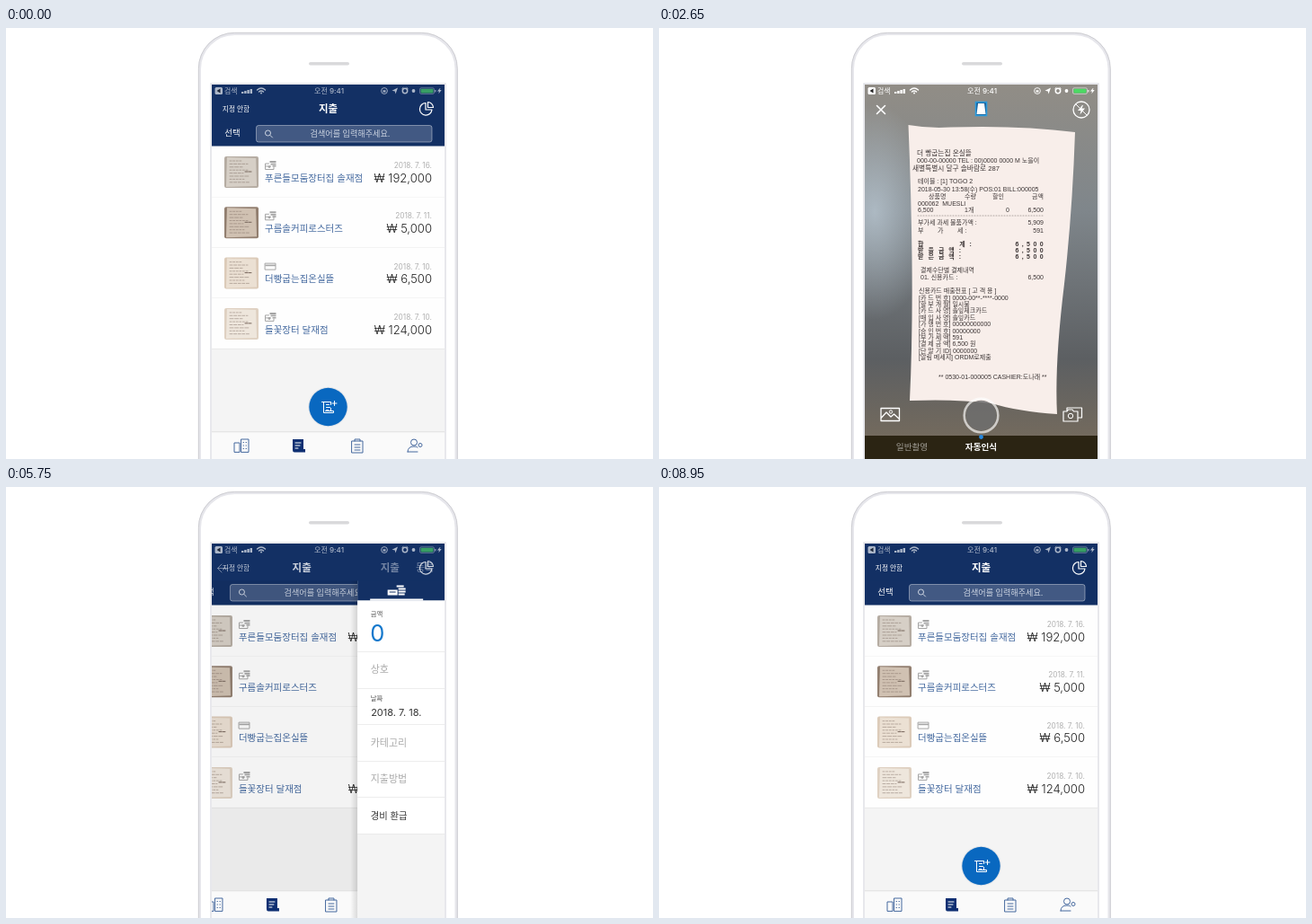
An HTML page that plays this animation: 720 px wide and 480 px high, repeating every 9000 ms.

```html
<!DOCTYPE html>
<html lang="ko">
<head>
<meta charset="utf-8">
<style>
  html, body { margin: 0; width: 100%; height: 100%; overflow: hidden; background: #fff; }
  svg { display: block; }
  text { font-family: Inter, "Noto Sans CJK KR", "Noto Sans CJK JP", sans-serif; white-space: pre; }
  .receipt text { font-family: "Liberation Sans", "Noto Sans CJK KR", "Noto Sans CJK JP", sans-serif; }
  .line { fill: none; stroke-width: 1; stroke-linecap: round; stroke-linejoin: round; }
</style>
</head>
<body>
<script>
const NAVY = '#133064';

// Markup helpers; text is placed by its vertical centre.
const text = (x, y, size, str, fill = '#fff', anchor = 'start', extra = '') =>
  `<text x="${x}" y="${y + size * 0.36}" font-size="${size}" fill="${fill}" text-anchor="${anchor}" ${extra}>${str}</text>`;
const rect = (x, y, w, h, fill, extra = '') =>
  `<rect x="${x}" y="${y}" width="${w}" height="${h}" fill="${fill}" ${extra}/>`;
const line = (d, stroke = '#fff', extra = '') => `<path class="line" d="${d}" stroke="${stroke}" ${extra}/>`;
const fill = (d, color = '#fff') => `<path d="${d}" fill="${color}"/>`;
const circle = (x, y, r, color, extra = '') => `<circle cx="${x}" cy="${y}" r="${r}" fill="${color}" ${extra}/>`;
const group = (id, content, extra = '') => `<g id="${id}" ${extra}>${content}</g>`;
const at = (x, y, content, scale = 1) => `<g transform="translate(${x} ${y}) scale(${scale})">${content}</g>`;
const BOLD = 'font-weight="700"', MEDIUM = 'font-weight="500"', LIGHT = 'font-weight="300"';

const cashIcon = color =>
  fill('M-1-5H6V-3H-1ZM0-2.3H6V-.6H0ZM2 0H6V1.6H2Z', color) +
  line('M-2-2H-6V4.5H3.5V2M-6 1H0', color) + circle(-1.5, 1.6, 1.4, color);
const cardIcon = color => line('M-6-3.5H5.5V3.5H-6Z', color) + rect(-6, -2, 11.5, 1.6, color);

// Expense list
function thumbnail(y, paper, edge) {
  let marks = '';
  for (let i = 0; i < 8; i++) {
    marks += line(`M249 ${y + 5 + i * 3.4}H${262 + (i * 7) % 13}`, '#75645a',
      `stroke-dasharray="${2 + i % 3} 1.6" opacity=".55" style="stroke-width:.8"`);
  }
  return rect(243, y, 38, 35, edge, 'rx="2"') +
    fill(`M246 ${y + 1}L278 ${y + 2}L279 ${y + 33}L245 ${y + 34}Z`, paper) + marks +
    line(`M266 ${y + 17}h8`, '#75645a', 'stroke-dasharray="3 1"');
}
const expenses = [
  ['푸른들모둠장터집 솔재점', '2018. 7. 16.', '192,000', cashIcon, '#d6cfc6', '#b5aca2'],
  ['구름솔커피로스터즈', '2018. 7. 11.', '5,000', cashIcon, '#d0c1b2', '#927f70'],
  ['더빵굽는집온실뜰', '2018. 7. 10.', '6,500', cardIcon, '#ebe0d3', '#dccbb9'],
  ['들꽃장터 달재점', '2018. 7. 10.', '124,000', cashIcon, '#eee6dc', '#dfd1c2'],
];
const rows = expenses.map(([name, date, amount, icon, paper, edge], i) => {
  const y = 132 + i * 56.3;
  return rect(229, y, 259, 56.3, '#fefefe') + rect(229, y + 56, 259, 0.8, '#e6e6e6') +
    thumbnail(y + 11, paper, edge) + at(294.5, y + 21, icon('#a5a5a5')) +
    text(288, y + 35, 10.5, name, '#44699f') +
    text(474, y + 21, 8.3, date, '#b0b0b0', 'end') +
    text(474, y + 35, 13.1, '₩ ' + amount, '#222', 'end', LIGHT);
}).join('');

const receiptPlus = line('M-6-6H4M-4-6V6H7V4H-2M4-6V-3M4 1V4M-1-3H2M-1 0H3M-1 3H1M8-7V-2M5.5-4.5H10.5');
const list = rect(229, 63, 259, 470, '#f4f4f4') + rect(229, 63, 259, 68.5, NAVY) +
  text(252, 117, 9.4, '선택', '#fff', 'middle', MEDIUM) +
  rect(278.5, 108.5, 195.5, 18.5, '#ffffff33', 'rx="2.5" stroke="#ffffff80" stroke-width=".8"') +
  circle(291.5, 117, 3, 'none', 'stroke="#cdd5e2"') + line('M294 119.5L296.5 122', '#cdd5e2') +
  text(383, 117.5, 9.1, '검색어를 입력해주세요.', '#cdd5e2', 'middle') + rows;

const tabs = rect(229, 449.5, 345, 80, '#fafafa') + rect(229, 449.5, 345, 0.7, '#d5d5d5') +
  line('M254 472V462H260V472ZM261.5 472V458H270V472ZM264 461.5h.5M267 461.5h.5M264 465h.5M267 465h.5M264 468.5h.5M267 468.5h.5', '#45689e') +
  fill('M319 458H331V469H333V472.5H321Q319 472.5 319 470Z', '#0e2f72') +
  line('M322 462H328M322 465H327M322 468H325') +
  line('M385 460H397V473H385ZM388 460V458H394V460M388 464H394M388 467H394M388 470H394', '#45689e') +
  line('M447 472Q447 466 454 466Q457 466 458 467M447 472H458', '#45689e') +
  circle(454, 461.5, 3.5, 'none', 'stroke="#45689e"') + circle(461, 464.5, 2, 'none', 'stroke="#45689e"');

const fab = circle(358.5, 422, 22.2, '#dfe3e8') + circle(358.5, 422, 21.2, '#0968c0') + at(357.5, 422.5, receiptPlus);

// Expense form
const letters = ['', 'ABC', 'DEF', 'GHI', 'JKL', 'MNO', 'PQRS', 'TUV', 'WXYZ'];
function key(col, row, digit, sub = '') {
  const x = 233 + col * 85, y = 349 + row * 33.7;
  return rect(x, y + 1, 81, 29.3, '#8f9299', 'rx="3"') + rect(x, y, 81, 29.3, '#fff', 'rx="3"') +
    text(x + 40.5, y + (digit ? 10.5 : 14.5), 16, digit || 0, '#111', 'middle') +
    text(x + 41, y + 22.5, 6, sub, '#111', 'middle', 'font-weight="600" letter-spacing="1"');
}
const keypad = rect(229, 318, 259, 28, '#f5f5f7') + text(240, 331, 10.6, '기호변환', '#2b93d8') +
  rect(229, 345.5, 259, 190, '#d1d3da') +
  letters.map((sub, i) => key(i % 3, Math.floor(i / 3), i + 1, sub)).join('') + key(1, 3, 0);

const car = line('M-10 2Q-10-1-6-1.5L-3-4.5H3L6-1.5Q10-1 10 2.5H8M-10 2.5H-8M-4 2.5H4M-6-1.5H6M0-4.5V-1.5') +
  circle(-6, 3, 1.9, 'none', 'stroke="#fff"') + circle(6, 3, 1.9, 'none', 'stroke="#fff"');
const stack = fill('M0-6H8V-4H0ZM2-3H10V-1H2ZM2 0H10V2H2ZM2 3H9V5H2Z') + rect(-10, -1, 11, 6, '#fff') + rect(-8, 1, 7, 1, NAVY);
const form = rect(221, 104, 8, 430, 'url(#shadow)') + rect(229, 104, 259, 430, '#f4f4f4') +
  rect(229, 104, 259, 22.5, NAVY) + at(272.5, 115.5, stack) + at(358, 115, car) +
  rect(243, 124.5, 59, 2, '#fff') + rect(229, 126.5, 259, 259.5, '#fff') +
  [183, 224, 264, 305, 345, 386].map(y => rect(229, y, 259, 0.8, '#e9e9e9')).join('') +
  text(243.5, 141.5, 7.4, '금액', '#555') + text(243, 163, 25.5, '0', '#1478cc') +
  rect(377, 155.5, 60, 14, '#fff', 'rx="2.5" stroke="#b9b9b9" stroke-width=".8"') + text(385, 162.5, 7.6, 'KRW', '#555') +
  text(243.5, 203.5, 11, '상호', '#aaa') + text(243.5, 235.5, 7.4, '날짜', '#555') +
  text(244, 251, 11, '2018. 7. 18.', '#333') + text(243.5, 285, 11, '카테고리', '#aaa') +
  text(243.5, 325.5, 11, '지출방법', '#aaa') + text(243.5, 366, 10.3, '경비 환급', '#333') + group('keypad', keypad);

// Camera
const ink = '#3d3636';
const print = (x, y, str, anchor = 'start', extra = '') => text(x, y, 7, str, ink, anchor, extra);
const details = ['[카 드 번 호] 0000-00**-****-0000', '[할 부 개 월] 일시불', '[카 드 사 명] 솔잎체크카드',
  '[매 입 사 명] 솔잎카드', '[가 맹 번 호] 00000000000', '[승 인 번 호] 00000000',
  '[부 가 세 액] 591', '[결 제 금 액] 6,500 원', '[단 말 기 ID] 0000000', '[알림 메세지] ORDM로제출'];
const receipt = fill('M277.5 108Q300 112 325 110.5Q400 108 463 116Q460 205 451 285Q440 375 443 430Q400 427 370 418Q330 413 279 415Q285 290 277.5 108Z', '#f8eeea') +
  text(287, 139, 7.7, '더 빵굽는집 온실뜰', ink) +
  print(287, 147.5, '000-00-00000 TEL : 00)0000 0000 M 노을이') +
  text(282, 156, 7.7, '새별특별시 달구 솔바람로 287', ink) +
  print(288, 170.5, '테이블 : [1] TOGO 2') +
  print(288, 179.5, '2018-05-30 13:58(수) POS:01 BILL:000005') +
  print(300, 187, '상품명') + print(340, 187, '수량') + print(371, 187, '할인') + print(428, 187, '금액', 'end') +
  print(288, 195, '000062  MUESLI') +
  print(288, 202.5, '6,500') + print(340, 202.5, '1개') + print(386, 202.5, '0') + print(428, 202.5, '6,500', 'end') +
  line('M288 209H428', ink, 'stroke-dasharray="1 2" opacity=".4"') +
  print(288, 216.5, '부가세 과세 물품가액 :') + print(428, 216.5, '5,909', 'end') +
  print(288, 225, '부        가        세 :') + print(428, 225, '591', 'end') +
  ['합     계:', '받을금액:', '받은금액:'].map((s, i) =>
    print(288, 240 + i * 7.3, s, 'start', BOLD + ' letter-spacing="5"') +
    print(431, 240 + i * 7.3, '6,500', 'end', BOLD + ' letter-spacing="3.4"')).join('') +
  print(291, 269, '결제수단별 결제내역') + print(291, 277, '01. 신용카드 :') + print(428, 277, '6,500', 'end') +
  print(289, 292, '신용카드 매출전표 [ 고 객 용 ]') +
  details.map((s, i) => print(289, 300 + i * 7.4, s)).join('') +
  print(311, 388, '** 0530-01-000005 CASHIER:도나래 **');

const bolt = fill('M1-5L-4 1H-.5L-1.5 5.5L4-1.5H.5L2-5Z');
const camera = rect(229, 63, 259, 470, '#000') +
  group('feed', rect(229, 63, 259, 470, 'url(#desk)') + rect(229, 63, 259, 470, 'url(#glow)') +
    group('paper', receipt, 'class="receipt"') +
    group('detected', fill('M269.5 110L470 114Q460 270 449 432L275 421Z', '#3292e6'))) +
  line('M242.5 86.5L251.5 95.5M251.5 86.5L242.5 95.5', '#fff', 'style="stroke-width:1.6"') +
  rect(352.5, 82.5, 12, 15, '#17588f', 'stroke="#2a9bdd" stroke-width="1.6"') + fill('M355 84H362L363.5 96H353.5Z') +
  circle(470, 91, 9, 'none', 'stroke="#fff" stroke-width="1.3"') + at(470, 91, bolt) + line('M464 85L476 97') +
  line('M247 423.5H267.5V437.5H247ZM247.5 434L253 428L258 433L261.5 430L267 435', '#fff', 'style="stroke-width:1.3"') +
  circle(258, 427.5, 1.7, 'none', 'stroke="#fff"') +
  circle(358.5, 431.5, 16.8, '#6f6f6f', 'opacity=".8"') + circle(358.5, 431.5, 18.8, 'none', 'stroke="#ffffffa8" stroke-width="2.6"') +
  group('burst', line('M450 427H454L455.5 425H460L461.5 427H466V438H450ZM454 426V423H470.5V434H467', '#fff', 'style="stroke-width:1.2"') +
    circle(458, 432, 2.7, 'none', 'stroke="#fff"')) +
  rect(229, 454, 259, 80, '#1a1300', 'opacity=".8"') + circle(358.5, 455.5, 2.4, '#2587df') +
  text(0, 467, 9.6, '일반촬영', '#fff', 'middle', 'id="manual"') +
  text(0, 467, 9.6, '자동인식', '#fff', 'middle', 'id="auto"');

// Navigation and status bars
const nav = rect(229, 63, 259, 41.5, NAVY) +
  group('oldNav', text(256, 90.5, 7.7, '지정 안함', '#fff', 'middle', MEDIUM) +
    line('M467 83.5A6.8 6.8 0 1 0 474 91H467ZM469.5 82.5V88.5H475.5A6.3 6.3 0 0 0 469.5 82.5', '#fff', 'style="stroke-width:1.2"')) +
  text(358.5, 89.5, 11.5, '지출', '#fff', 'middle', BOLD + ' id="oldTitle"') +
  group('newNav', line('M247 90.5H236M240 86L235.5 90.5L240 95') + text(466, 90, 11, '등록', '#fff', 'middle', MEDIUM)) +
  text(358.5, 89.5, 11.5, '지출', '#fff', 'middle', BOLD + ' id="newTitle"');

const status = rect(232.5, 66, 8.5, 8, '#fff', 'rx="1.5"') + fill('M238.5 67.5V72.5L234.5 70Z', '#222') +
  text(243, 70, 7.9, '검색') + [0, 1, 2, 3].map(i => rect(262 + i * 3.2, 71 - i, 2.4, 2 + i, '#fff')).join('') +
  line('M279.5 69Q284 65 288.5 69M281.5 71Q284 69 286.5 71', '#fff', 'style="stroke-width:1.4"') + circle(284, 72.6, 1, '#fff') +
  text(359.5, 70, 8.1, '오전 9:41', '#fff', 'middle', MEDIUM) +
  circle(421, 70, 3.4, 'none', 'stroke="#fff" stroke-width=".9"') + rect(419.5, 69.3, 3, 2.2, '#fff') +
  fill('M436 66.5L433.5 73.5L432.8 70.5L429.5 69.8Z') +
  circle(444, 70, 2.7, 'none', 'stroke="#fff" stroke-width="1.5"') + line('M440.8 67.5L442 66.5M447.2 67.5L446 66.5') +
  circle(453.5, 70, 1.9, '#fff') +
  rect(460.5, 66.8, 16, 6.6, 'none', 'rx="1.6" stroke="#ffffffa0" stroke-width=".8"') + rect(461.5, 67.8, 14, 4.6, '#4cd964', 'rx=".8"') +
  rect(477.4, 69, 1, 2.4, '#fff') + at(482.3, 70, bolt, 0.6);

document.body.innerHTML = `<svg width="720" height="480" viewBox="0 0 720 480">
  <defs>
    <linearGradient id="desk" x2="0" y2="1">
      <stop offset="0" stop-color="#918d86"/><stop offset=".3" stop-color="#7f868b"/>
      <stop offset=".65" stop-color="#5c5f62"/><stop offset=".85" stop-color="#756b5d"/>
    </linearGradient>
    <radialGradient id="glow" gradientUnits="userSpaceOnUse" cx="0" cy="0" r="1" gradientTransform="translate(240 205) scale(65 120)">
      <stop offset="0" stop-color="#bccad5" stop-opacity=".75"/><stop offset="1" stop-color="#bccad5" stop-opacity="0"/>
    </radialGradient>
    <linearGradient id="shadow"><stop offset="0" stop-opacity="0"/><stop offset="1" stop-opacity=".13"/></linearGradient>
  </defs>
  ${rect(215.5, 6.5, 285.5, 600, '#fff', 'rx="39" stroke="#e6e6eb" stroke-width="3"')}
  ${rect(214.3, 5.3, 288, 600, 'none', 'rx="40" stroke="#c4c4ca" stroke-width=".8"')}
  ${rect(337, 38, 45, 3.6, '#d9d9db', 'rx="1.8"')}
  ${rect(228, 62, 261, 450, '#fff', 'stroke="#dedfe4" stroke-width="1.4"')}
  <svg x="229" y="63" width="259" height="417" viewBox="229 63 259 417">
    ${group('list', list)}
    ${rect(229, 104, 259, 346, '#000', 'id="dim"')}
    ${group('tabs', tabs)}${group('fab', fab)}
    ${group('form', form)}${nav}${group('camera', camera)}${group('status', status)}
  </svg></svg>`;

const el = id => document.getElementById(id);
const move = (id, x, y = 0) => el(id).setAttribute('transform', `translate(${x} ${y})`);
const fade = (id, value) => el(id).setAttribute('opacity', clamp(value));
const clamp = v => Math.min(1, Math.max(0, v));
const smooth = (t, start, end) => { const p = clamp((t - start) / (end - start)); return p * p * (3 - 2 * p); };

// Critically damped spring from 0 to 1.
function spring(t, start) {
  const u = Math.max(0, t - start) * 0.014;
  const p = 1 - (1 + u) * Math.exp(-u);
  return p > 0.998 ? 1 : p;
}

function draw(now) {
  const t = now % 9000;

  const cameraShown = spring(t, 1425) - spring(t, 3347);
  move('camera', 0, 461 * (1 - cameraShown));
  fade('status', t > 1500 && t < 3347 ? 1 : 0.65);
  fade('feed', t >= 2050 ? 1 : 0);
  const mode = smooth(t, 2250, 2480);
  move('manual', 358.5 - 77 * mode);
  move('auto', 435.5 - 77 * mode);
  fade('manual', 1 - 0.45 * mode);
  fade('auto', 0.55 + 0.45 * mode);
  el('manual').setAttribute('font-weight', mode < 0.5 ? 700 : 400);
  el('auto').setAttribute('font-weight', mode < 0.5 ? 400 : 700);
  fade('burst', mode);
  const drift = smooth(t, 2650, 3400);
  el('paper').setAttribute('transform',
    `translate(${-7 * drift} 388) scale(1 ${1 + 0.016 * drift}) translate(0 -388)`);
  fade('detected', t >= 2950 ? 0.6 : 0);

  const push = spring(t, 5658) - spring(t, 7615);
  move('list', -77.7 * push);
  move('tabs', -77.7 * push);
  fade('dim', 0.12 * push);
  fade('fab', push > 0 ? 0 : 1);
  move('form', 259 * (1 - push));
  fade('form', push > 0 ? 1 : 0);
  move('keypad', 0, 206 * (1 - spring(t, 6150)));
  move('oldTitle', -122 * push ** 1.45);
  move('newTitle', 110 * (1 - push));
  fade('oldTitle', 1 - 1.5 * push * push);
  fade('oldNav', 1 - 1.6 * push * push);
  fade('newTitle', push * 1.9 - 0.3);
  fade('newNav', push * 1.9 - 0.3);

  requestAnimationFrame(draw);
}
requestAnimationFrame(draw);
</script>
</body>
</html>
```
